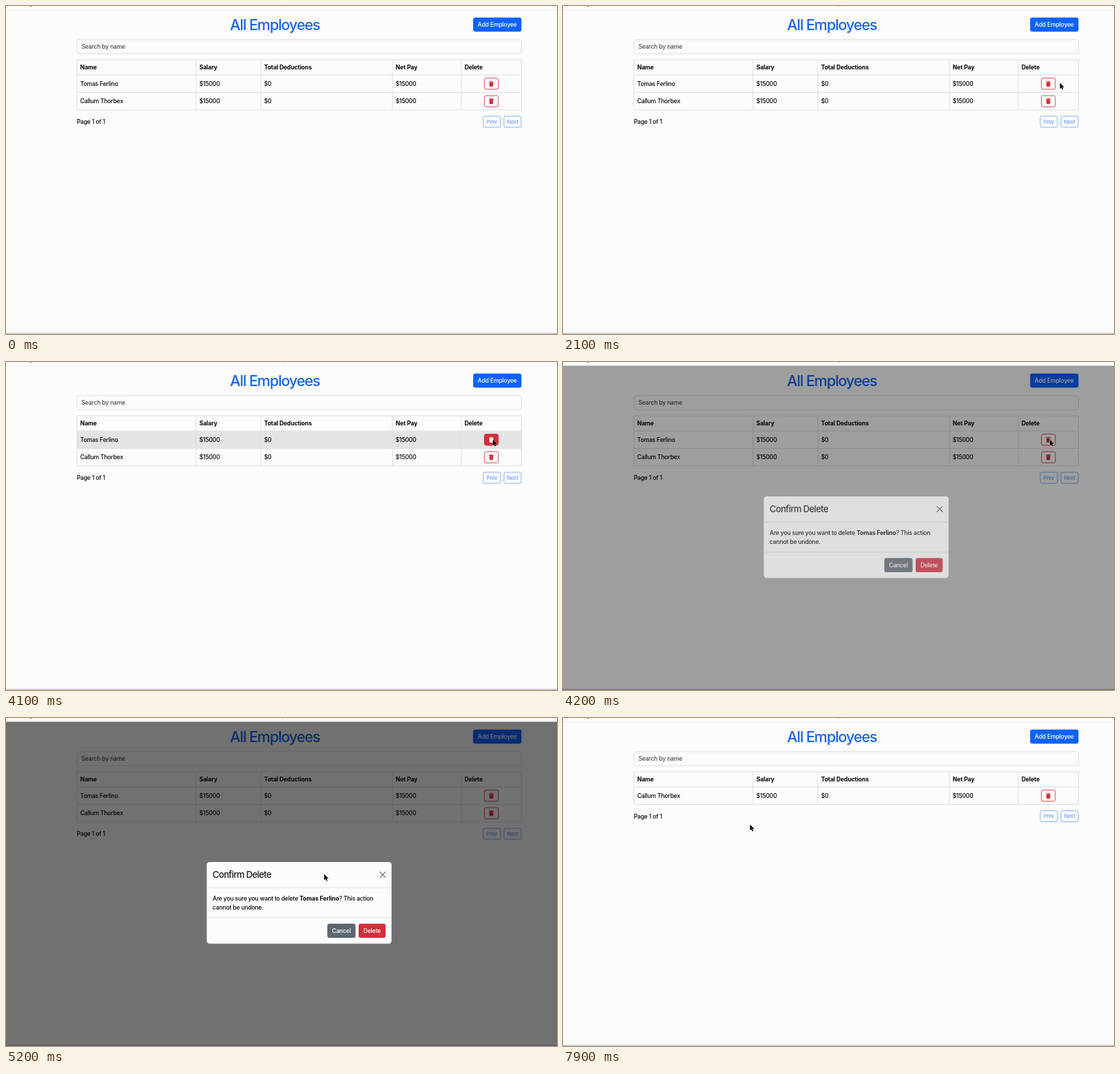
Recreate the animation shown at these times as an HTML page. Size 800 px wide and 476 px high, loop 8000 ms.

```html
<!DOCTYPE html>
<html lang="en">
<head>
<meta charset="utf-8">
<title>All Employees</title>
<style>
  html, body { margin: 0; width: 100%; height: 100%; overflow: hidden; background: #fcfcfc; }
  svg { display: block; width: 100vw; height: 100vh; }
  text { font: 450 8.6px Inter, "Liberation Sans", sans-serif; letter-spacing: -.022em; fill: #050505; white-space: pre; }
  .bold { font-weight: 700; letter-spacing: -.012em; }
  .title { font-weight: 550; font-size: 21.5px; letter-spacing: -.049em; fill: #1466ec; }
  .heading { font-weight: 550; font-size: 12.9px; letter-spacing: -.043em; fill: #15181b; }
  .small { font-size: 7.5px; fill: #6f9ff1; }
  .mid { text-anchor: middle; }
  .light { fill: #fff; }
  .hint { fill: #484b4e; }
  .line { fill: none; stroke: #dcdee0; }
</style>
</head>
<body>
<svg id="stage" viewBox="0 0 800 476"></svg>
<script>
const $ = id => document.getElementById(id);
const LEFT = 103, RIGHT = 748.5, WIDTH = RIGHT - LEFT, ROW = 25.4, TOP = 78, HEAD = 22;
const BLUE = '#0b62fb', RED = '#d22d3d', person = 'Tomas Ferlino';

const text = (x, y, s, cls = '') => `<text x="${x}" y="${y}" class="${cls}">${s}</text>`;
const box = (x, y, w, h, r, attrs) =>
  `<rect x="${x}" y="${y}" width="${w}" height="${h}" rx="${r}" ${attrs}/>`;
const button = (x, y, w, label, attrs) =>
  box(x, y, w, 20.5, 3.2, attrs) + text(x + w / 2, y + 13.5, label, 'light mid');
const pager = (x, label) =>
  box(x, 160, 25, 16, 2.4, 'fill="none" stroke="#84adf5"') + text(x + 12.5, 170.8, label, 'small mid');

const columns = { Name: LEFT, Salary: 276, 'Total Deductions': 370, 'Net Pay': 561, Delete: 661 };
const edges = [...Object.values(columns), RIGHT];

const tableRow = (y, h, base, values, cls) =>
  `<path class="line" d="M${LEFT} ${y + h}H${RIGHT}${edges.map(x => `M${x} ${y}v${h}`).join('')}"/>` +
  values.map((s, i) => text(edges[i] + 4.7, y + base, s, cls)).join('');

const employee = (id, index, name) => {
  const y = TOP + HEAD + index * ROW;
  return `<g id="${id}">
    ${box(LEFT, y, WIDTH, ROW, 0, `id="${id}Bg" fill="none"`)}
    ${tableRow(y, ROW, 16, [name, '$15000', '$0', '$15000'])}
    ${box(694.6, y + 4.7, 20.2, 16.2, 2.4, `id="${id}Btn" fill="none" stroke="${RED}" stroke-width=".85"`)}
    <path id="${id}Icon" fill="${RED}" transform="translate(704.6 ${y + 12.8})"
      d="M-3.4 -3.4H-1.2L-.8 -4.1H.8L1.2 -3.4H3.4V-2.3H-3.4ZM-2.9 -1.9H2.9L2.6 3.3Q2.5 4.1 1.7 4.1H-1.7Q-2.5 4.1 -2.6 3.3Z"/>
  </g>`;
};

$('stage').innerHTML = `
  <rect width="800" height="476" fill="#fcfcfc"/>
  <path d="M0 5.5H800" stroke="#f0f0f0"/>
  <path d="M34 0q2 .9 4 0M400.5 0h2" stroke="#777" stroke-width=".8" fill="none"/>
  <path d="M0 475.2H800" stroke="#a8a8a8"/>
  ${text(390.5, 35, 'All Employees', 'title mid')}
  ${button(678.2, 16.8, 70.2, 'Add Employee', `id="add" fill="${BLUE}"`)}
  ${box(LEFT, 48.8, WIDTH, 20.4, 3.2, 'class="line"')}
  ${text(109.5, 62, 'Search by name', 'hint')}
  <path class="line" d="M${LEFT} ${TOP}H${RIGHT}"/>
  ${tableRow(TOP, HEAD, 14.3, Object.keys(columns), 'bold')}
  ${employee('first', 0, person)}
  <g id="rest">
    ${employee('second', 1, 'Callum Thorbex')}
    ${text(102.7, 171.2, 'Page 1 of 1')}
    ${pager(693, 'Prev')}${pager(723, 'Next')}
  </g>
  <rect id="shade" y="5.5" width="800" height="470.5"/>
  <g id="modal">
    ${box(291.5, 209, 268.3, 118.4, 4.2, 'fill="#fcfcfc"')}
    <path class="line" d="M291.5 246.2h268.3m0 43.6h-268.3"/>
    ${text(300, 232, 'Confirm Delete', 'heading')}
    <path d="M542.9 223.4l8 8m0-8l-8 8" stroke="#666" stroke-width="1.1" stroke-linecap="round"/>
    ${text(300, 264.5, `Are you sure you want to delete <tspan class="bold">${person}</tspan>? This action`)}
    ${text(300, 277.5, 'cannot be undone.')}
    ${button(466.5, 298.5, 41, 'Cancel', 'fill="#5d666f"')}
    ${button(512, 298.5, 39.2, 'Delete', 'id="confirm"')}
  </g>
  <path id="cursor" d="M0 0V8.8L2 7L3.3 10L4.8 9.3L3.5 6.4H6.2Z" stroke="#fff" stroke-width=".7" paint-order="stroke"/>`;

const ENTER = 100, OPEN = 4104, CLOSE = 7350, FADE = 140, SLIDE = 300;
const clamp = v => Math.min(1, Math.max(0, v));
const progress = (t, start, length) => clamp((t - start) / length);

// Each move eases the pointer to a new place; sag bows the path downwards
const moves = [
  { from: ENTER, to: 1500, x: 722, y: 12 },
  { from: 1500, to: 2100, x: 721.5, y: 111.5 },
  { from: 2100, to: 2600, x: 706.8, y: 112.5 },
  { from: 4400, to: 5200, x: 462, y: 226.5 },
  { from: 5200, to: 5900, x: 380, y: 301 },
  { from: 5900, to: 6900, x: 527.5, y: 303, sag: 27 },
  { from: 7300, to: 7800, x: 425, y: 158 },
  { from: 7800, to: 7900, x: 271.5, y: 154.5 }
];

function pointer(t) {
  let x = 690, y = 363;
  for (const m of moves) {
    const k = 1 - (1 - progress(t, m.from, m.to - m.from)) ** 2;
    x += (m.x - x) * k;
    y += (m.y - y) * k + (m.sag || 0) * Math.sin(Math.PI * k);
  }
  return [x, y];
}

const over = ([x, y], id) => {
  const b = $(id).getBBox();
  return x >= b.x && x <= b.x + b.width && y >= b.y && y <= b.y + b.height;
};
const paint = (id, color) => $(id).setAttribute('fill', color);
const show = (id, on) => $(id).setAttribute('visibility', on ? 'visible' : 'hidden');
const move = (id, x, y) => $(id).setAttribute('transform', `translate(${x} ${y})`);

function draw(t) {
  const p = pointer(t);
  const open = t > OPEN && t < CLOSE;
  const gone = t >= CLOSE + FADE;
  const fade = progress(t, OPEN, FADE) * (1 - progress(t, CLOSE, FADE));
  const slide = progress(t, OPEN, SLIDE) * (1 - progress(t, CLOSE, SLIDE));
  const hover = t > 2100 && t < OPEN;
  const hot = hover && over(p, 'firstBtn');

  show('cursor', t >= ENTER);
  move('cursor', ...p);
  paint('add', !open && over(p, 'add') ? '#0b55d6' : BLUE);
  paint('firstBg', hover ? '#e4e4e4' : 'none');
  paint('firstBtn', hot ? RED : 'none');
  paint('firstIcon', hot ? '#fff' : RED);
  show('first', !gone);
  move('rest', 0, gone ? -ROW : 0);

  $('shade').setAttribute('opacity', .55 * fade);
  $('modal').setAttribute('opacity', fade);
  move('modal', 0, -26.8 * (1 - slide) ** 1.7);
  paint('confirm', over(p, 'confirm') ? '#a92632' : RED);
}

// The screen refreshes in steps of 100 ms
function tick() {
  draw(Math.floor(performance.now() % 8000 / 100) * 100);
  requestAnimationFrame(tick);
}
tick();
</script>
</body>
</html>
```
